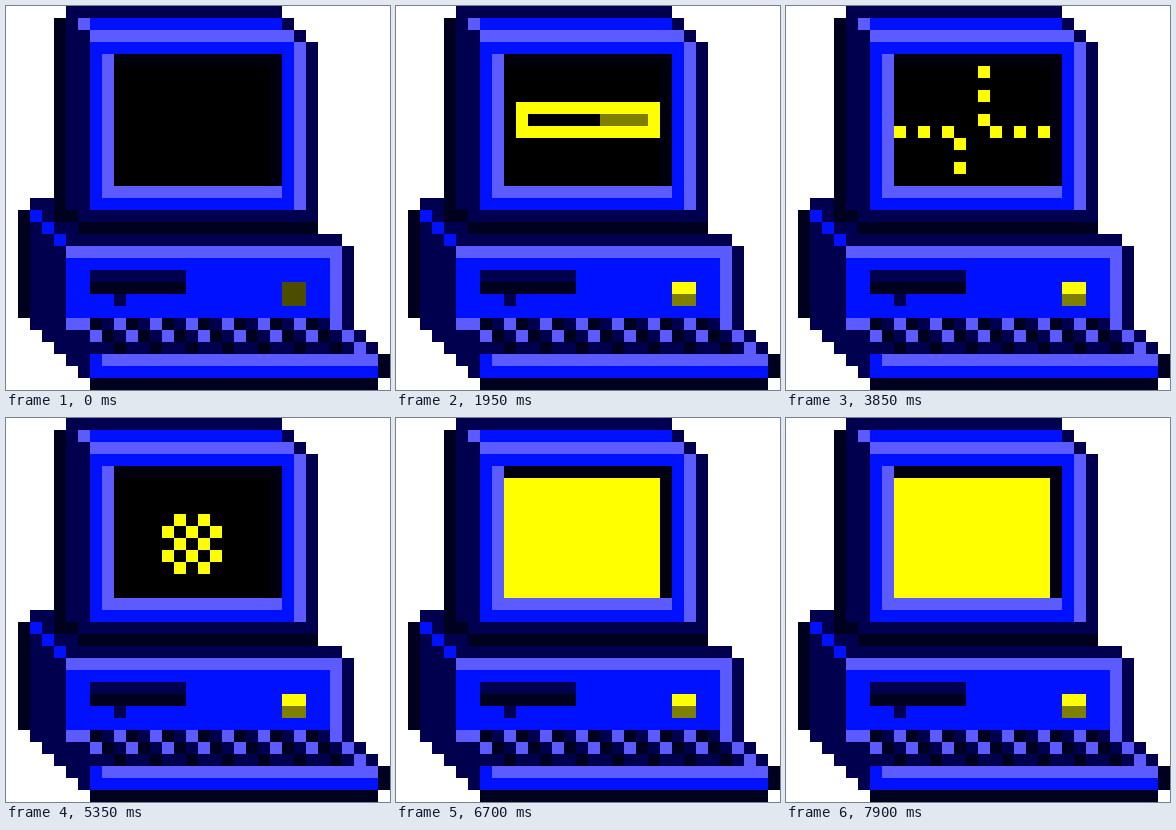
These frames come from a looping animation (384 by 384 pixels, 8 s). An HTML page:

```html
<!DOCTYPE html>
<html lang="en">
<head>
<meta charset="utf-8">
<title>Pixel computer</title>
<style>
  html, body { margin: 0; width: 100%; height: 100%; overflow: hidden; background: #fff; }
  svg { display: block; width: 100vw; height: 100vh; }
</style>
</head>
<body>
<svg viewBox="0 0 32 32" shape-rendering="crispEdges">
  <g id="body"></g>
  <path id="shade" fill="#000"/>
  <path id="dim" fill="#7f7f00"/>
  <path id="lit" fill="#ff0"/>
</svg>
<script>
const LOOP = 8000, STEP = 150;
const NAVY = '#00004f', DARK = '#00001f', BLUE = '#0011ff', LIGHT = '#5b5bff';
const $ = id => document.getElementById(id);

function box(color, x, y, w = 1, h = 1) {
  const r = document.createElementNS('http://www.w3.org/2000/svg', 'rect');
  const attrs = { x, y, width: w, height: h, fill: color };
  for (const k in attrs) r.setAttribute(k, attrs[k]);
  $('body').append(r);
}

function drawBase() {
  box(NAVY, 2, 16, 2);
  box(DARK, 1, 17, 1, 9);
  box(NAVY, 2, 17, 3, 9);
  for (let i = 0; i < 3; i++) box(BLUE, 2 + i, 17 + i);
  box(NAVY, 5, 19, 23);
  box(LIGHT, 5, 20, 23);
  box(NAVY, 28, 20, 1, 6);
  box(BLUE, 5, 21, 22, 5);
  box(LIGHT, 27, 21, 1, 5);
  box(NAVY, 7, 22, 8);
  box(DARK, 7, 23, 8);
  box(NAVY, 9, 24);
  box('#4d4d00', 23, 23, 2, 2);
}

function drawMonitor() {
  box(NAVY, 5, 0, 18);
  box(NAVY, 5, 1, 2, 16);
  box(DARK, 4, 1, 1, 16);
  box(DARK, 4, 17, 2);
  box(NAVY, 6, 17, 20);
  box(NAVY, 4, 18, 2);
  box(DARK, 6, 18, 20);
  box(LIGHT, 6, 1);
  box(BLUE, 7, 1, 16);
  box(NAVY, 23, 1);
  box(LIGHT, 7, 2, 17);
  box(NAVY, 24, 2);
  box(BLUE, 7, 3, 17, 14);
  box(LIGHT, 24, 3, 1, 14);
  box(NAVY, 25, 3, 1, 14);
  box(LIGHT, 8, 4, 1, 12);
  box(LIGHT, 8, 15, 15);
  box('#00000f', 9, 4, 14, 11);
  box('#000', 9, 5, 13, 10);
}

function drawKeyboard() {
  for (let i = 0; i < 3; i++) {
    box(NAVY, 2 + i, 26 + i, 27);
    for (let k = 0; k < 7; k++) box(DARK, 7 + i + 3 * k, 26 + i);
    box(LIGHT, 27 + i, 26 + i);
  }
  box(LIGHT, 5, 26, 2);
  for (let k = 0; k < 7; k++) {
    box(LIGHT, 7 + 3 * k, 27);
    if (k < 6) box(LIGHT, 9 + 3 * k, 26);
  }
  box(NAVY, 5, 29, 2);
  box(BLUE, 7, 29);
  box(LIGHT, 8, 29, 23);
  box(NAVY, 6, 30);
  box(BLUE, 7, 30, 24);
  box(DARK, 31, 29, 1, 2);
  box(DARK, 7, 31, 24);
}

const rect = (x, y, w = 1, h = 1) => `M${x} ${y}h${w}v${h}h${-w}z`;

// Screen cell relative to the centre of the pattern.
function dot(dx, dy) {
  const x = 15 + dx, y = 10 + dy;
  return x < 9 || x > 21 || y < 5 || y > 14 ? '' : rect(x, y);
}

function field(r, test) {
  let d = '';
  for (let y = -r; y <= r; y++)
    for (let x = -r; x <= r; x++) if (test(x, y)) d += dot(x, y);
  return d;
}

const FILL_TIMES = [1450, 1550, 1850, 1950, 2250, 2350, 2450, 2550, 2850, 3150];

function loadingBar(t) {
  const half = Math.min(6, 2 + Math.floor((t - 850) / 100));
  const x = 16 - half, w = half * 2;
  const n = FILL_TIMES.filter(v => t >= v).length;
  return {
    lit: rect(x, 8, w) + rect(x, 10, w) + rect(x, 9) + rect(x + w - 1, 9),
    dim: n ? rect(21 - n, 9, n) : ''
  };
}

// Dots stream in from four sides, meet, then burst.
function streams(t) {
  const n = Math.floor((t - 3400) / STEP);
  let d = '';
  if (n < 4) {
    for (let k = 0; k < n; k++) {
      const v = 7 - 2 * (n - k), h = 8 - 2 * (n - k);
      d += dot(1, -v) + dot(-1, v) + dot(h, 0) + dot(-h, 0);
    }
    return d;
  }
  const r = (n - 4) * 2;
  if (!r) return dot(0, 0);
  return field(r, (x, y) => Math.max(Math.abs(x), Math.abs(y)) === r && x * y % r === 0);
}

function spread(t) {
  const n = Math.floor((t - 5050) / STEP);
  if (!n) return dot(0, 0);
  const solid = n - 5;
  return field(Math.min(n, 6), (x, y) =>
    (x + y) % 2 !== 0 || (n > 6 && Math.max(Math.abs(x), Math.abs(y)) <= solid));
}

function render(t) {
  let lit = '', dim = '', shade = '';
  if (t >= 550) {
    lit += rect(23, 23, 2);
    dim += rect(23, 24, 2);
  }
  if (t >= 850 && t < 3250) {
    const bar = loadingBar(t);
    lit += bar.lit;
    dim += bar.dim;
  } else if (t >= 3250 && t < 3400) {
    shade = rect(22, 8) + rect(22, 10);
  } else if (t >= 3400 && t < 4450) {
    lit += streams(t);
  } else if (t >= 5050 && t < 6700) {
    lit += spread(t);
  } else if (t >= 6700 && (t < 7300 || t >= 7900)) {
    lit += rect(9, 5, 13, 10);
  }
  $('lit').setAttribute('d', lit);
  $('dim').setAttribute('d', dim);
  $('shade').setAttribute('d', shade);
}

drawBase();
drawMonitor();
drawKeyboard();

const start = performance.now();
function tick() {
  render((performance.now() - start) % LOOP);
  requestAnimationFrame(tick);
}
render(0);
requestAnimationFrame(tick);
</script>
</body>
</html>
```
